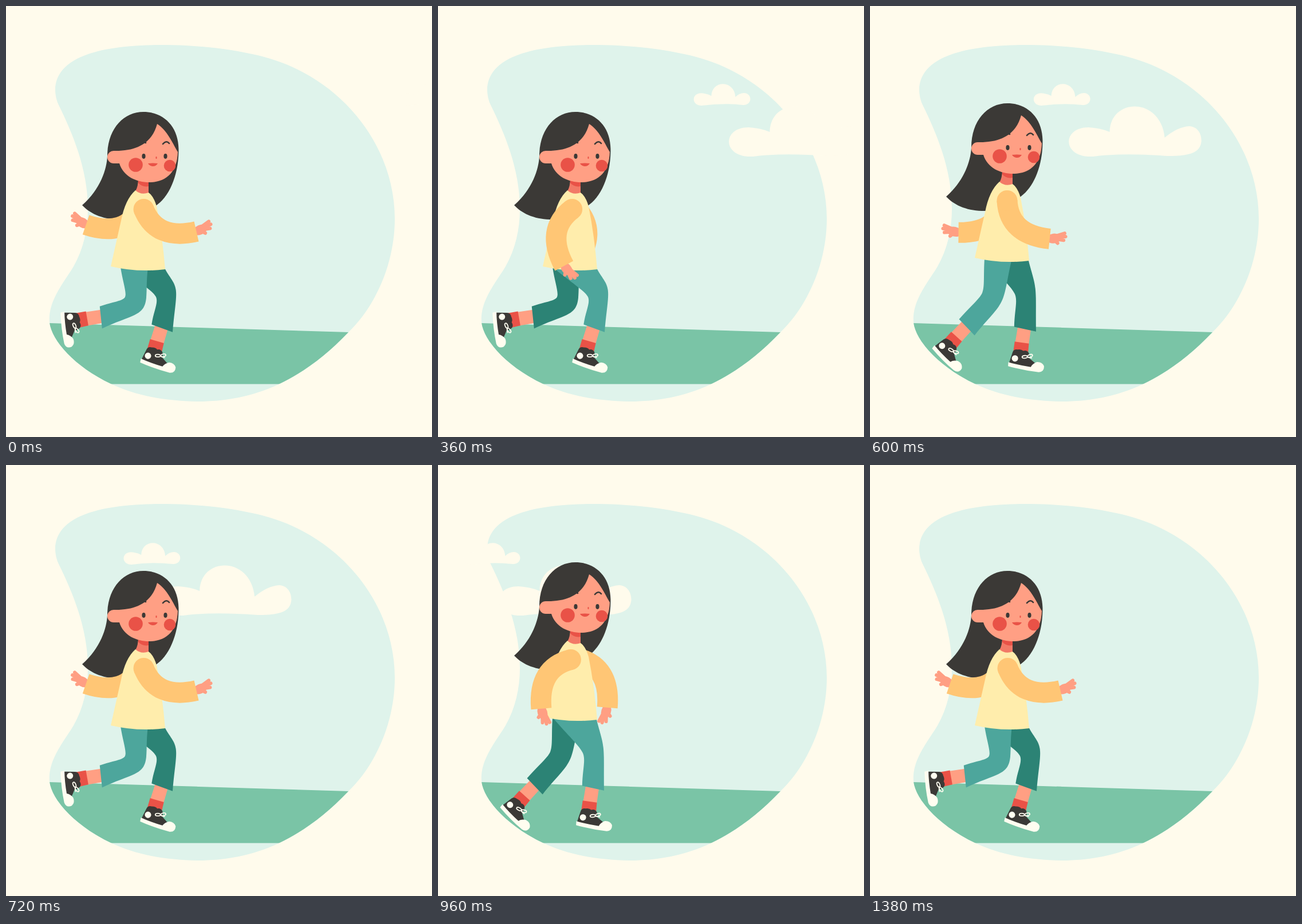
An HTML page that plays this animation: 744 px wide and 753 px high, repeating every 1440 ms.

```html
<!DOCTYPE html>
<html lang="en">
<head>
<meta charset="utf-8">
<title>Walking girl</title>
<style>
  html, body { margin: 0; width: 100%; height: 100%; overflow: hidden; background: #fffbec; }
  svg { display: block; width: 744px; height: 753px; }
  .arm { fill: none; stroke: #ffc675; stroke-width: 36; }
</style>
</head>
<body>
<svg viewBox="0 0 744 753">
  <defs>
    <path id="blob" d="M270 68C330 68 385 74 430 84C575 113 679 236 679 372C679 450 645 525 598 570C560 610 520 640 478 660C430 683 380 691 335 691C270 690 220 678 183 660C120 630 80 585 76 553C73 515 100 485 118 455C135 425 143 390 143 355C143 285 116 222 92 173C88 165 86 155 86 146C87 95 150 68 270 68Z"/>
    <clipPath id="inBlob"><use href="#blob"/></clipPath>
    <g id="foot">
      <path fill="#ff9f83" d="M-11-48H12V-12H-12Z"/>
      <path fill="#e95247" d="M-13-15L12-15L13 5H-13Z"/>
      <path fill="#3b3936" d="M-14 4Q-13-2-6-2Q0-4 4-1Q10-4 14 1Q17 6 16 10L27 17L24 28L-18 26Q-16 14-14 4Z"/>
      <path fill="#fffdf0" d="M-19 22L-18.5 29Q10 33 36 32Q46 30 43.5 20Q39 13 30 15Q23 19 21 25Q0 25-19 22Z"/>
      <circle fill="#fffdf0" cx="-8.5" cy="14" r="5.5"/>
      <g fill="none" stroke="#fffdf0" stroke-width="1.8">
        <ellipse cx="8" cy="9" rx="4.500" ry="2.3" transform="rotate(-14 8 9)"/>
        <ellipse cx="17" cy="6" rx="4.500" ry="2.3" transform="rotate(-28 17 6)"/>
        <path d="M12 8Q17 10 21 9"/>
      </g>
    </g>
    <g id="hand">
      <ellipse cx="7" rx="13" ry="8.500" fill="#ff9f83"/>
      <path fill="none" stroke="#ff9f83" stroke-width="6" stroke-linecap="round" d="M12-4L27-7M13-2L28-1M13 2L24 5M8 3L13 9"/>
    </g>
  </defs>

  <rect width="744" height="753" fill="#fffbec"/>
  <use href="#blob" fill="#dff3eb"/>
  <path clip-path="url(#inBlob)" fill="#7ac4a6" d="M60 553.5L600 570V660.500H60Z"/>

  <g id="clouds" fill="#fffbec">
    <path d="M380 174C360 174 362 148 385 153Q392 154 397 157C398 129 437 129 439 159Q446 152 454 152C470 153 468 174 452 173Q418 169 380 174Z"/>
    <path d="M470 263C415 266 415 212 462 212Q482 213 499 220C500 160 588 158 595 230Q618 211 638 210C655 211 660 227 659 237C657 258 635 262 600 262Q520 256 470 263Z"/>
  </g>

  <g class="bob">
    <path fill="#3b3936" d="M240 185C275 185 301 210 301.500 250C302 295 285 335 260 350L205 373C175 374 150 366 133 348C165 320 176 285 177 262C177 215 205 185 240 185Z"/>
    <g transform="matrix(-1 0 0 1 476 -2)">
      <use class="hand" href="#hand"/><path class="arm"/>
    </g>
  </g>

  <use class="foot" href="#foot"/><path class="leg" fill="#2c8375"/>
  <use class="foot" href="#foot"/><path class="leg" fill="#4da69c"/>

  <g class="bob">
    <path fill="#f27a67" d="M231 300H249V328Q237 332 226 323Q231 316 231 300Z"/>
    <path fill="#e95247" d="M231 300H249V315Q238 317 231 309Z"/>
    <path fill="#ffedac" d="M226 322Q236 331 249 326Q258 332 263 350Q273 400 278 460Q230 466 183 455Q193 410 201 375Q208 338 226 322Z"/>
    <path fill="#ff9f84" d="M264 206C255 240 228 254 188 253A11 11 0 0 0 188 275L198 275C205 298 228 308 250 308C280 308 299 290 300 255C290 238 282 218 264 206Z"/>
    <g fill="#e95247">
      <circle cx="226.500" cy="277.500" r="12.300"/>
      <circle cx="286" cy="279" r="10.300"/>
      <path d="M248 275Q257 274 265 275Q262 280 257 280Q251 280 248 275Z"/>
      <rect x="261.500" y="263" width="2" height="4" rx="1"/>
    </g>
    <g fill="#3b3936">
      <ellipse cx="240.500" cy="262.500" rx="3.100" ry="4.400"/>
      <ellipse cx="278.500" cy="262.500" rx="3.100" ry="4.400"/>
    </g>
    <path fill="none" stroke="#3b3936" stroke-width="2.6" stroke-linecap="round" d="M274 241Q280 234 285 240M242 238L244 239"/>
    <use class="hand" href="#hand"/><path class="arm"/>
    <circle id="shoulder" cy="355" r="18" fill="#ffc675"/>
  </g>
</svg>

<script>
const STEP = 60, FRAMES = 24, STRIDE = 12, RAD = Math.PI / 180;
const all = s => [...document.querySelectorAll(s)];
const bobs = all('.bob'), arms = all('.arm'), hands = all('.hand'), legs = all('.leg'), feet = all('.foot');
const clouds = document.getElementById('clouds'), shoulder = document.getElementById('shoulder');

// Key points: phase in the stride, then values
const bobKeys = [[0, 0], [1.2, -5.5], [2, -22], [3, -24], [4, -15]];
const swingKeys = [[0, 23], [.7, 17], [4, 121], [6, 98], [7.2, 80], [8, 63]];
// Ankle x, y, shoe angle, knee bend
const stepKeys = [
  [0, 127, 549, 80, 34], [1.2, 183, 547, 72, 48], [2, 234, 575, 40, 40], [4, 263.5, 603, 8, 17],
  [6, 260, 600, 16, 25], [7.2, 173.5, 596, 31, 10], [8, 127.5, 592, 42, 7], [10, 141.5, 589, 42, 18]
];

// Periodic cubic through uneven keys
function sample(keys, phase, period = STRIDE) {
  const n = keys.length, p = ((phase % period) + period) % period;
  const key = i => keys[(i + n) % n];
  const time = i => key(i)[0] + period * Math.floor(i / n);
  let i = n - 1;
  while (time(i) > p) i--;
  const h = time(i + 1) - time(i), u = (p - time(i)) / h, v = 1 - u;
  return key(i).slice(1).map((a, j) => {
    const at = k => key(k)[j + 1];
    const slope = k => (at(k + 1) - at(k - 1)) / (time(k + 1) - time(k - 1)) * h;
    return v * v * (1 + 2 * u) * a + u * u * (3 - 2 * u) * at(i + 1)
      + u * v * (v * slope(i) - u * slope(i + 1));
  });
}

// Point reached from p by going along and then across a direction
function move([x, y], angle, along, across = 0) {
  const c = Math.cos(angle), s = Math.sin(angle);
  return [x + along * c - across * s, y + along * s + across * c];
}

// The whole arm turns about the shoulder with a fixed elbow
function drawArm(i, phase) {
  const swing = sample(swingKeys, phase)[0] * RAD;
  const top = [235 + 6 * Math.cos(swing), 355];
  const elbow = move(top, swing, 42, 42), wrist = move(top, swing, 100);
  const tilt = Math.atan2(wrist[1] - elbow[1], wrist[0] - elbow[0]) / RAD - 12;
  arms[i].setAttribute('d', `M${top}Q${elbow} ${wrist}`);
  hands[i].setAttribute('transform', `translate(${wrist}) rotate(${tilt})`);
  if (i) shoulder.setAttribute('cx', top[0]);
}

const mid = (a, b) => [(a[0] + b[0]) / 2, (a[1] + b[1]) / 2];

// Trouser edge bending at the knee, parallel to the hip-cuff line there
function edge(from, knee, to, r) {
  const shift = k => [knee[0] + k * (to[0] - from[0]), knee[1] + k * (to[1] - from[1])];
  return `C${mid(from, knee)} ${shift(-r)} ${knee}C${shift(r)} ${mid(knee, to)} ${to}`;
}

function drawLeg(i, phase, dy) {
  const [x, y, tilt, bend] = sample(stepKeys, phase);
  const lead = Math.max(-1, Math.min(1, 4 * Math.sin((phase - .5) * Math.PI / 6)));
  const hipBack = [200, 456 + dy], hipFront = [262 + 14 * lead, 456 + dy];
  const hip = mid(hipBack, hipFront);
  const cuff = move([x, y], tilt * RAD, 2, -39);
  const cuffAt = w => move(cuff, (tilt + 4) * RAD, w);
  const axis = Math.atan2(cuff[1] - hip[1], cuff[0] - hip[0]);
  const kneeAt = w => move(mid(hip, cuff), axis, 0, -bend - w);
  const cuffBack = cuffAt(-19.5);
  legs[i].setAttribute('d', `M${hipFront}${edge(hipFront, kneeAt(18.5), cuffAt(19.5), .13)}`
    + `L${cuffBack}${edge(cuffBack, kneeAt(-18.5), hipBack, .1)}Z`);
  feet[i].setAttribute('transform', `translate(${x} ${y}) rotate(${tilt})`);
}

function draw(ms) {
  const k = Math.floor(ms / STEP) % FRAMES;
  const late = Math.max(0, k - 16);
  const phase = k + late * late / 49; // the second stride ends slightly early
  const dy = sample(bobKeys, phase, STRIDE / 2)[0];
  bobs.forEach(b => b.setAttribute('transform', `translate(0 ${dy})`));
  clouds.setAttribute('transform', `translate(${(8 - phase) * 40.2} 0)`);
  drawArm(0, phase + .7);
  drawArm(1, phase);
  drawLeg(0, phase + STRIDE / 2, dy);
  drawLeg(1, phase, dy);
}

const start = performance.now();
function tick() {
  draw(performance.now() - start);
  requestAnimationFrame(tick);
}
tick();
</script>
</body>
</html>
```
